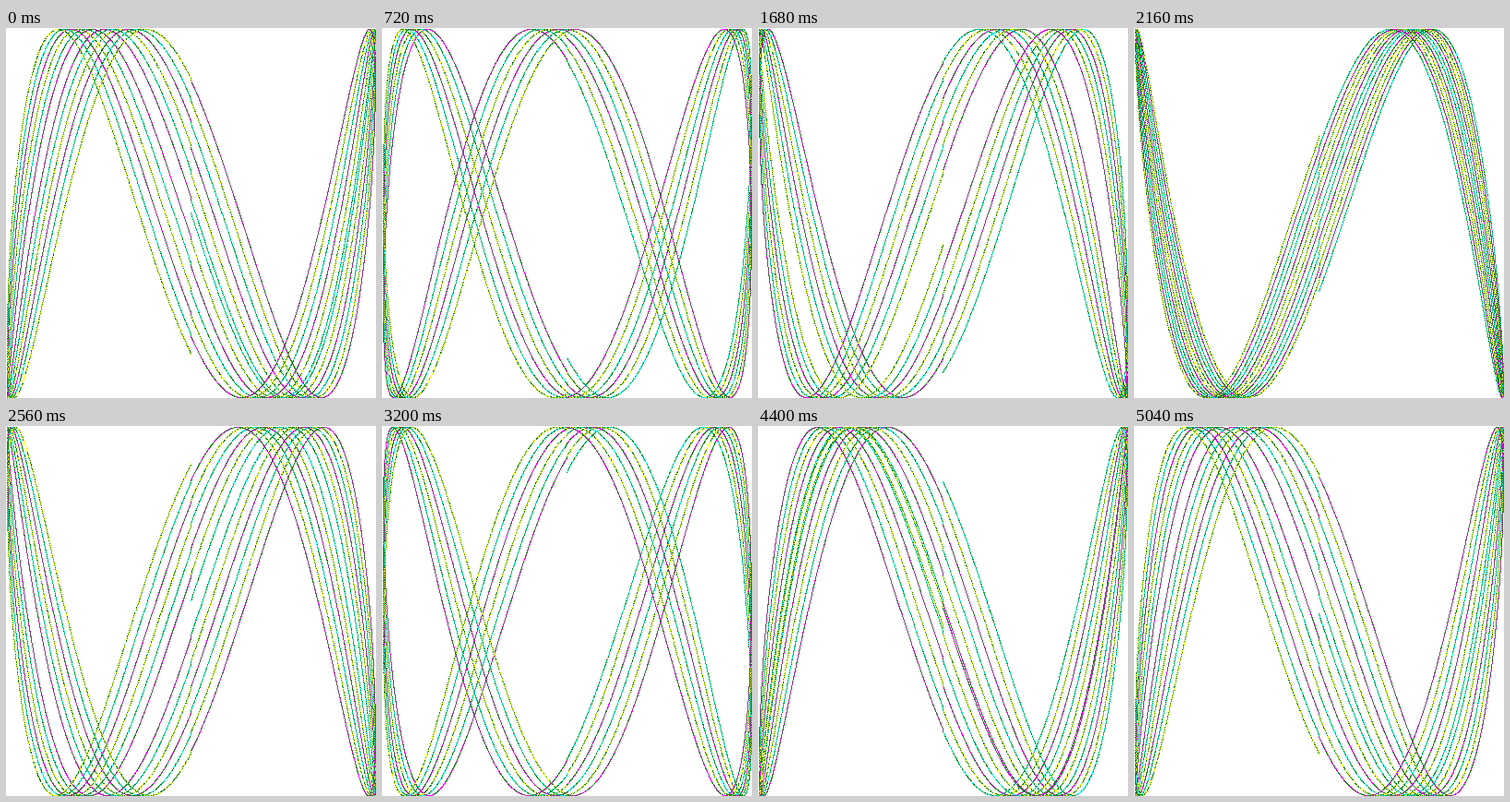
An HTML page with a canvas that plays this animation: 401x401 px, repeating every 5120 ms.

```html
<!DOCTYPE html>
<html lang="en">
<head>
<meta charset="utf-8">
<title>Lissajous</title>
<style>
  html, body { margin: 0; width: 100%; height: 100%; overflow: hidden; background: #fff; }
  canvas { display: block; width: 401px; height: 401px; }
</style>
</head>
<body>
<canvas id="stage" width="401" height="401"></canvas>
<script>
const SIZE = 200, WIDTH = 2 * SIZE + 1;
const CYCLES = 6, RES = 0.001;
const FREQ = 0.6046602879796196 * 5;
const FRAMES = 64, DELAY = 80, PHASE_STEP = 0.1;

// Colours as little-endian ABGR
const WHITE = 0xffffffff, GREEN = 0xff008000;
const TINTS = [0xffffff00, 0xffff00ff, 0xff00ffff];

const ctx = document.getElementById('stage').getContext('2d');
const image = ctx.createImageData(WIDTH, WIDTH);
const pixels = new Uint32Array(image.data.buffer);

const toPixel = v => SIZE + Math.trunc(v * SIZE + 0.5);

// Every half swing mixes green with one tint
function pick(step, t) {
  const mixed = Math.imul(step + 1, 0x9e3779b1) >>> 16;
  return mixed & 1 ? GREEN : TINTS[Math.floor(t / Math.PI) % TINTS.length];
}

function draw(frame) {
  const phase = frame * PHASE_STEP;
  const steps = Math.ceil(CYCLES * 2 * Math.PI / RES);
  pixels.fill(WHITE);
  for (let i = 0; i < steps; i++) {
    const t = i * RES;
    const x = toPixel(Math.sin(t));
    const y = toPixel(Math.sin(t * FREQ + phase));
    pixels[y * WIDTH + x] = pick(i, t);
  }
  ctx.putImageData(image, 0, 0);
}

let shown = -1;
function tick() {
  const frame = Math.floor(performance.now() / DELAY) % FRAMES;
  if (frame !== shown) draw(shown = frame);
  requestAnimationFrame(tick);
}
tick();
</script>
</body>
</html>
```
